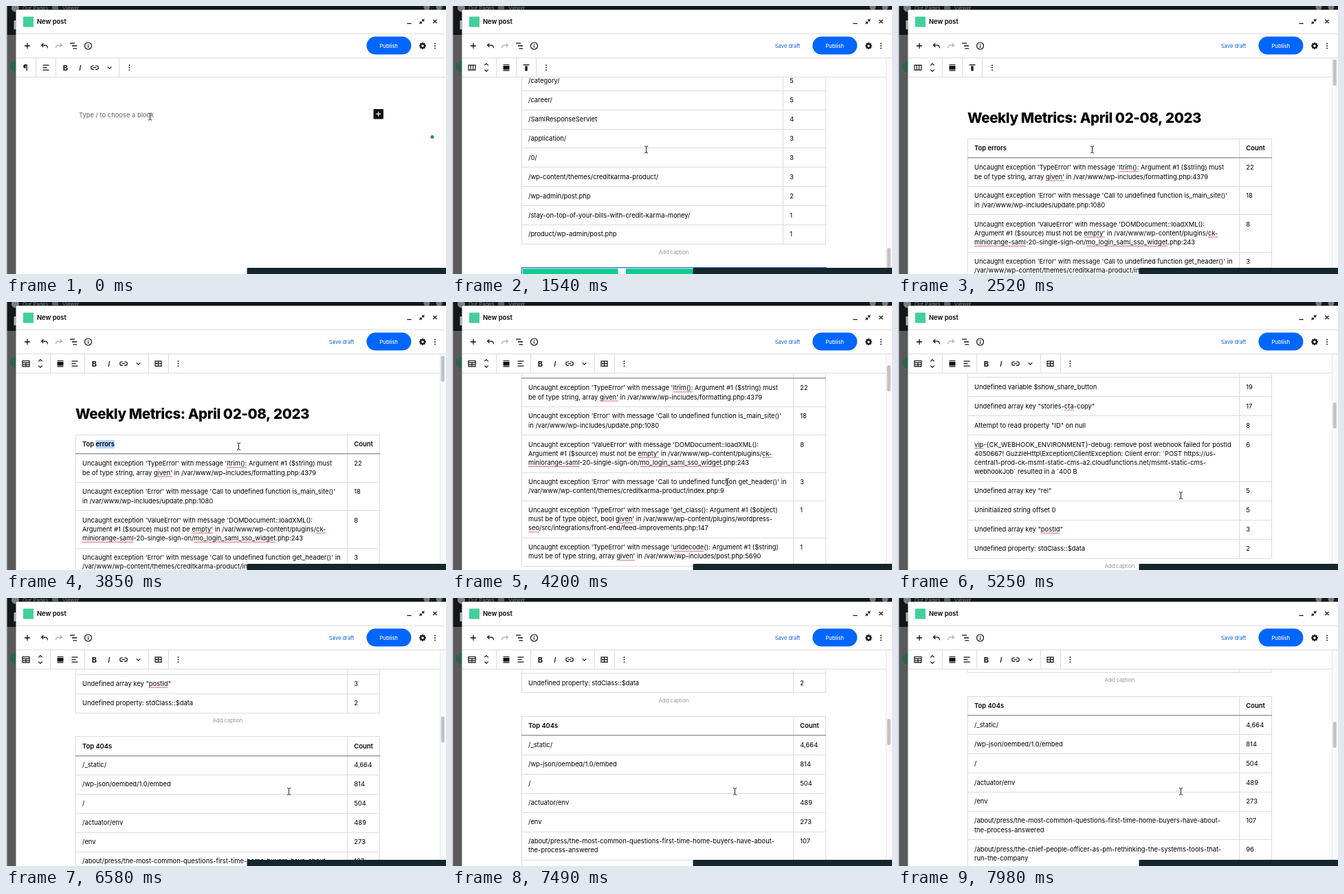
Write an HTML page with a canvas that moves like this. It is 640 px wide and 390 px high and loops after 8000 ms.

```html
<!DOCTYPE html>
<html lang="en">
<head>
<meta charset="utf-8">
<title>New post</title>
<style>
html, body { margin: 0; width: 100%; height: 100%; overflow: hidden; background: #fff; }
canvas { display: block; }
</style>
</head>
<body>
<canvas id="stage" width="640" height="390"></canvas>
<script>
const ctx = document.getElementById('stage').getContext('2d');
const LOOP = 8000, STEP = 70;
const PASTE = 910, CLICK = 2940, SELECT = 3010;
const LINE = 13.15, PAD = 14.8, GAP = 34.8;
const BODY = 9.38, SMALL = 7.6;
const LEFT = 101, RIGHT = 543;
const INK = '#111', RULE = '#dcdcdc', BLUE = '#0066ff';

// ---------- drawing helpers ----------
const font = (size, weight = 400, style = '') =>
  `${style} ${weight} ${size}px Inter, "Liberation Sans", sans-serif`;

function text(s, x, y, size = BODY, color = '#000', weight = 400, style = '') {
  ctx.font = font(size, weight, style);
  ctx.fillStyle = color;
  ctx.fillText(s, x, y);
}

function box(x, y, w, h, color, r = 0) {
  ctx.fillStyle = color;
  ctx.beginPath();
  ctx.roundRect(x, y, w, h, r);
  ctx.fill();
}

function dot(x, y, r, color = INK) {
  ctx.fillStyle = color;
  ctx.beginPath();
  ctx.arc(x, y, r, 0, 7);
  ctx.fill();
}

function icon(x, y, path, color = INK, width = 1.2) {
  ctx.save();
  ctx.translate(x, y);
  ctx.strokeStyle = color;
  ctx.lineWidth = width;
  ctx.stroke(new Path2D(path));
  ctx.restore();
}

const hline = (x1, x2, y, color = RULE, h = 1) => box(x1, Math.round(y), x2 - x1, h, color);
const vline = (x, y1, y2, color = RULE) => box(x, Math.round(y1), 1, Math.round(y2) - Math.round(y1), color);
const dots = (x, y) => [-3.5, 0, 3.5].forEach(d => dot(x, y + d, 0.9));

// ---------- motion ----------
// Monotone cubic through [time, value] keys: holds stay flat, moves stay smooth.
function track(keys, t) {
  const n = keys.length - 1;
  if (t <= keys[0][0]) return keys[0][1];
  if (t >= keys[n][0]) return keys[n][1];
  const slope = i => i < 0 || i >= n ? 0 : (keys[i + 1][1] - keys[i][1]) / (keys[i + 1][0] - keys[i][0]);
  const tangent = i => {
    const a = slope(i - 1), b = slope(i);
    return a * b > 0 ? 2 * a * b / (a + b) : 0;
  };
  let i = 0;
  while (t > keys[i + 1][0]) i++;
  const [t0, v0] = keys[i], [t1, v1] = keys[i + 1];
  const h = t1 - t0, u = (t - t0) / h, w = 1 - u;
  return v0 * w * w * (1 + 2 * u) + v1 * u * u * (3 - 2 * u) +
    h * u * w * (w * tangent(i) - u * tangent(i + 1));
}

// ---------- document ----------
const words = ['about', 'press', 'cards', 'loans', 'auto', 'tools', 'advice', 'home', 'news', 'signup', 'feed', 'images', 'assets'];
const word = i => words[i % words.length];

function paths(n, seed, high, low) {
  return Array.from({ length: n }, (_, i) => {
    const k = seed + i * 5;
    const tail = i % 3 ? word(k + 4) + '/' : '';
    return [`/${word(k)}/${tail}`, String(Math.round(high + (low - high) * i / n))];
  });
}

// "|" breaks a line, "~" wraps a word flagged by the spell checker.
const tables = [
  { title: 'Top errors', col: 496, rows: [
    ["Uncaught exception 'TypeError' with message '~ltrim():~ Argument #1 ($string) must|be of type string, array ~given'~ in /var/www/wp-includes/formatting.php:4379", '22'],
    ["Uncaught exception 'Error' with message 'Call to undefined function is_main_site()'|in /var/www/wp-includes/update.php:1080", '18'],
    ["Uncaught exception 'ValueError' with message 'DOMDocument::loadXML():|Argument #1 ($source) must not be ~empty'~ in /var/www/wp-content/plugins/~ck-~|~miniorange-saml~-20-single-sign-on/~mo_login_saml_sso_widget~.php:243", '8'],
    ["Uncaught exception 'Error' with message 'Call to undefined function get_header()' in|/var/www/wp-content/themes/creditkarma-product/index.php:9", '3'],
    ["Uncaught exception 'TypeError' with message 'get_class(): Argument #1 ($object)|must be of type object, bool ~given'~ in /var/www/wp-content/plugins/wordpress-|~seo~/src/integrations/front-end/feed-improvements.php:147", '1'],
    ["Uncaught exception 'TypeError' with message '~urldecode~(): Argument #1 ($string)|must be of type string, array ~given'~ in /var/www/wp-includes/post.php:5690", '1']
  ] },
  { title: 'Top warnings', col: 496, rows: [
    ['Undefined array key "host"', '64'],
    ['Undefined array key 1', '42'],
    ['Undefined variable $content', '25'],
    ['Undefined variable $show_share_button', '19'],
    ['Undefined array key "stories-~cta~-copy"', '17'],
    ['Attempt to read property "ID" on null', '8'],
    ['~vip~-{CK_WEBHOOK_ENVIRONMENT}-debug: remove post webhook failed for postId|4050667! GuzzleHttp\\Exception\\ClientException: Client error: `POST https://us-|central1-prod-ck-msmt-static-cms-a2.cloudfunctions.net/msmt-static-cms-|webhookJob` resulted in a `400 B', '6'],
    ['Undefined array key "rel"', '5'],
    ['Uninitialized string offset 0', '5'],
    ['Undefined array key "~postId~"', '3'],
    ['Undefined property: stdClass::$data', '2']
  ] },
  { title: 'Top 404s', col: 496, rows: [
    ['/_static/', '4,664'],
    ['/wp-json/oembed/1.0/embed', '814'],
    ['/', '504'],
    ['/actuator/env', '489'],
    ['/env', '273'],
    ['/about/press/the-most-common-questions-first-time-home-buyers-have-about-|the-process-answered', '107'],
    ['/about/press/the-chief-people-officer-as-pm-rethinking-the-systems-tools-that-|run-the-company', '96'],
    ...paths(13, 2, 90, 40)
  ] },
  { title: 'Top 403s', col: 496, rows: paths(10, 6, 60, 8) },
  { title: 'Top 500s', col: 481, rows: [
    ...paths(10, 9, 48, 6),
    ['/category/', '5'],
    ['/career/', '5'],
    ['/SamlResponseServlet', '4'],
    ['/application/', '3'],
    ['/0/', '3'],
    ['/wp-content/themes/creditkarma-product/', '3'],
    ['/wp-admin/post.php', '2'],
    ['/stay-on-top-of-your-bills-with-credit-karma-money/', '1'],
    ['/product/wp-admin/post.php', '1']
  ] }
];

let bottom = 193.2 - GAP;
for (const table of tables) {
  table.top = bottom + GAP;
  bottom = table.top + PAD + LINE;
  table.rows = table.rows.map(([label, count]) => {
    const lines = label.split('|');
    const row = { lines, count, top: bottom, height: PAD + LINE * lines.length };
    bottom += row.height;
    return row;
  });
  table.bottom = bottom;
}
const END = bottom - 346.2;

const scrollKeys = [
  [PASTE, 0], [1540, END], [1680, END], [2520, 0], [3850, 0], [4200, 110], [4340, 110],
  [4620, 173], [5180, 531.2], [5670, 531.2], [5880, 640], [6370, 640], [6580, 737.2],
  [6860, 765], [7420, 765], [7980, 796]
];
const mouseX = [
  [210, 209.5], [700, 282.5], [2520, 282.5], [2870, 150], [3080, 150], [3360, 421],
  [3780, 338.5], [3850, 338.5], [4270, 405.5], [4620, 405.5], [5180, 411.5]
];
const mouseY = [
  [210, 161], [700, 209], [2520, 209], [2870, 207], [3360, 212], [3780, 210],
  [3850, 210], [4270, 266], [4620, 266], [5180, 281.5]
];

function spellLine(s, x, y) {
  s.split('~').forEach((part, i) => {
    text(part, x, y);
    const w = ctx.measureText(part).width;
    if (i % 2) box(x, y + 1.9, w, 1.2, '#dc7f8c');
    x += w;
  });
}

function drawTable(table, scroll, selected) {
  const top = table.top - scroll, end = table.bottom - scroll;
  if (end < 70 || top > 400) return;
  const head = top + PAD + LINE;
  const countX = table.col + 10.3;
  if (selected) {
    ctx.font = font(BODY, 600);
    const skip = ctx.measureText('Top ').width;
    box(111 + skip, top + 7.6, ctx.measureText('errors').width, 12.4, '#b4d5fb');
  }
  text(table.title, 111, top + 17.2, BODY, '#000', 600);
  text('Count', countX, top + 17.2, BODY, '#000', 600);
  for (const row of table.rows) {
    const y = row.top - scroll;
    if (y > 390 || y + row.height < 100) continue;
    row.lines.forEach((s, i) => spellLine(s, 111, y + 17.2 + i * LINE));
    text(row.count, countX, y + 17.2);
    hline(LEFT, RIGHT + 1, y + row.height);
  }
  hline(LEFT, RIGHT + 1, top);
  for (const x of [LEFT, table.col, RIGHT]) vline(x, top, end);
  hline(LEFT, RIGHT + 1, head - 0.7, '#9a9a9a', 1.4);
  ctx.textAlign = 'center';
  text('Add caption', 322.5, end + 14.6, SMALL, '#949494');
  ctx.textAlign = 'left';
}

function drawTitle(y) {
  const size = 20.5;
  ctx.letterSpacing = `${-0.02 * size}px`;
  text('Weekly Metrics: April 02-08, 2023', 101, y, size, '#000', 800);
  ctx.letterSpacing = '0px';
}

function drawContent(t, scroll) {
  ctx.save();
  ctx.beginPath();
  ctx.rect(15, 104, 616, 286);
  ctx.clip();
  drawTitle(170.3 - scroll);
  tables.forEach((table, i) => drawTable(table, scroll, !i && t >= SELECT));
  const y = bottom - scroll + 34;
  if (y < 390) {
    for (let i = 0; i < 3; i++) box(103 + i * 150, y + 2, 138.5, 60, '#0fce8c');
    if (t < CLICK) {
      ctx.strokeStyle = '#2f6fd0';
      ctx.lineWidth = 1.3;
      ctx.strokeRect(101.5, y + 0.5, 443, 64);
    }
  }
  ctx.restore();
}

function drawEmpty(t) {
  text('Type / to choose a block', 106, 162, BODY, '#626262');
  box(534.5, 150, 14.5, 14.5, INK, 1);
  icon(541.7, 157.2, 'M-3.5 0H3.5M0-3.5V3.5', '#fff');
  if (t < 280) dot(620, 190.5, 2.5, '#1f8f70');
}

// ---------- window chrome ----------
function drawBackdrop() {
  box(0, 0, 640, 390, '#5a5a5a');
  box(0, 0, 640, 42, '#13171a');
  box(0, 0, 1.5, 390, '#d4d4d4');
  dot(13.5, 3, 5.5, '#7d8083');
  box(67, 0, 9, 5, '#5c6064', 1);
  text('Our Pages', 24, 6, SMALL, '#85888b');
  text('Viewer', 82, 6, SMALL, '#85888b');
  dot(612, 1.5, 4.5, '#75787b');
  dot(630, 1.5, 4.5, '#75787b');
  box(11.5, 21, 3, 13, '#b0b0b0');
  dot(15, 88, 9, '#2d6351');
  box(14.5, 5.6, 640, 400, '#fff', 2);
}

function drawHeader(dirty) {
  box(25, 15.5, 15, 15, '#43cf98', 1);
  text('New post', 45, 26, BODY, '#000', 600);
  icon(586.5, 25.5, 'M-3.2 0H3.2');
  icon(605, 22.5, 'M3.6-3.6L.8-.8M.8-3.4V-.8H3.4M-3.6 3.6L-.8 .8M-3.4 .8H-.8V3.4');
  icon(624, 22.5, 'M-2.6-2.6L2.6 2.6M2.6-2.6L-2.6 2.6');
  hline(15, 640, 40);

  icon(31, 58, 'M-4 0H4M0-4V4', INK, 1.3);
  const undo = 'M-1.6-3.6L-4.4-.9L-1.6 1.8M-4.2-.9H1.2Q4.4-.9 4.4 3.2';
  icon(56, 58, undo);
  ctx.save();
  ctx.translate(77, 58);
  ctx.scale(-1, 1);
  icon(0, 0, undo, '#aaa');
  ctx.restore();
  icon(98, 58, 'M-5-3.8H2M-2 0H5M-.5 3.8H5', INK, 1.3);
  icon(119.5, 58, 'M5 0A5 5 0 1 1 -5 0A5 5 0 1 1 5 0M0-.8V2.8M0-2.9V-1.7');

  ctx.textAlign = 'center';
  if (dirty) text('Save draft', 488, 60.7, SMALL, '#0a5fd8');
  box(524.4, 44.6, 65, 26, BLUE, 13);
  text('Publish', 556.8, 60.7, SMALL, '#fff', 500);
  ctx.textAlign = 'left';

  for (let i = 0; i < 8; i++) {
    ctx.save();
    ctx.translate(606, 58);
    ctx.rotate(i * Math.PI / 4);
    box(-1.1, -4.8, 2.2, 2.5, INK);
    ctx.restore();
  }
  icon(606, 58, 'M2.7 0A2.7 2.7 0 1 1 -2.7 0A2.7 2.7 0 1 1 2.7 0', INK, 1.9);
  dots(624, 58);
  hline(15, 640, 75);
}

const ALIGN = 'M-4.5-3.5H4.5M-4.5 0H1.5M-4.5 3.5H4.5';
const seps = xs => xs.forEach(x => vline(x, 76, 104));

function drawMovers() {
  icon(50, 90, 'M-2.8-3.6L0-6.2L2.8-3.6M-2.8 2.6L0 5.2L2.8 2.6');
}

function drawWide(x) {
  box(x - 4.5, 87, 9, 5.5, INK);
  icon(x, 89.7, 'M-4.5-4.2H4.5M-4.5 4.2H4.5');
}

function drawFormat(x) {
  text('B', x - 3.8, 93.8, 11, INK, 700);
  text('I', x + 19.8, 93.8, 11, INK, 500, 'italic');
  icon(x + 42.5, 89.7, 'M-1-2.7H-2.6A2.7 2.7 0 0 0 -2.6 2.7H-1M1-2.7H2.6A2.7 2.7 0 0 1 2.6 2.7H1M-2 0H2');
  icon(x + 64, 89.7, 'M-2.8-1.3L0 1.4L2.8-1.3');
}

function drawToolbar(t) {
  if (t < PASTE) {
    text('¶', 24.8, 93.8, 11.5, INK, 700);
    icon(58, 89.7, ALIGN);
    drawFormat(86.5);
    dots(179.5, 89.7);
    seps([43, 72, 164]);
  } else if (t < CLICK) {
    icon(29, 89.7, 'M-5-3.5H5V3.5H-5ZM-1.7-3.5V3.5M1.7-3.5V3.5');
    drawMovers();
    drawWide(79);
    box(103.5, 85, 9, 1.3, INK);
    box(106.3, 87.4, 3.4, 7, INK);
    dots(137, 89.7);
    seps([64, 93, 122]);
  } else {
    icon(29, 89.7, 'M-5-4.2H5V4.2H-5ZM-5-1.6H5M-5 1.4H5M0-1.6V4.2');
    drawMovers();
    drawWide(79);
    icon(100, 89.7, ALIGN);
    drawFormat(128.5);
    icon(221.5, 89.7, 'M-4.5-3.6H4.5V3.6H-4.5ZM-4.5 0H4.5M0-3.6V3.6');
    dots(250.5, 89.7);
    seps([64, 114, 207, 236]);
  }
  hline(15, t < PASTE ? 640 : 631, 103.4);
}

function drawScrollbar(scroll) {
  box(631, 76, 9, 314, '#fafafa');
  vline(631, 76, 390, '#e6e6e6');
  box(632.8, 78 + scroll * 0.128, 5, 38, '#c2c2c2', 2.5);
}

function drawCursor(x, y) {
  const beam = 'M-2.6-5Q0-5 0-3.6Q0-5 2.6-5M0-4V4M-2.6 5Q0 5 0 3.6Q0 5 2.6 5';
  icon(x, y, beam, 'rgba(255,255,255,.8)', 2.2);
  icon(x, y, beam, '#222', 1);
}

function draw(now) {
  const t = Math.floor(now % LOOP / STEP) * STEP;
  const pasted = t >= PASTE;
  const scroll = track(scrollKeys, t);
  drawBackdrop();
  if (pasted) drawContent(t, scroll);
  else drawEmpty(t);
  drawHeader(pasted);
  drawToolbar(t);
  if (pasted) drawScrollbar(scroll);
  box(350.5, 381, 290, 9, '#15262c', [1.5, 0, 0, 0]);
  drawCursor(track(mouseX, t), track(mouseY, t));
}

const start = performance.now();
function frame() {
  draw(performance.now() - start);
  requestAnimationFrame(frame);
}
frame();
</script>
</body>
</html>
```
